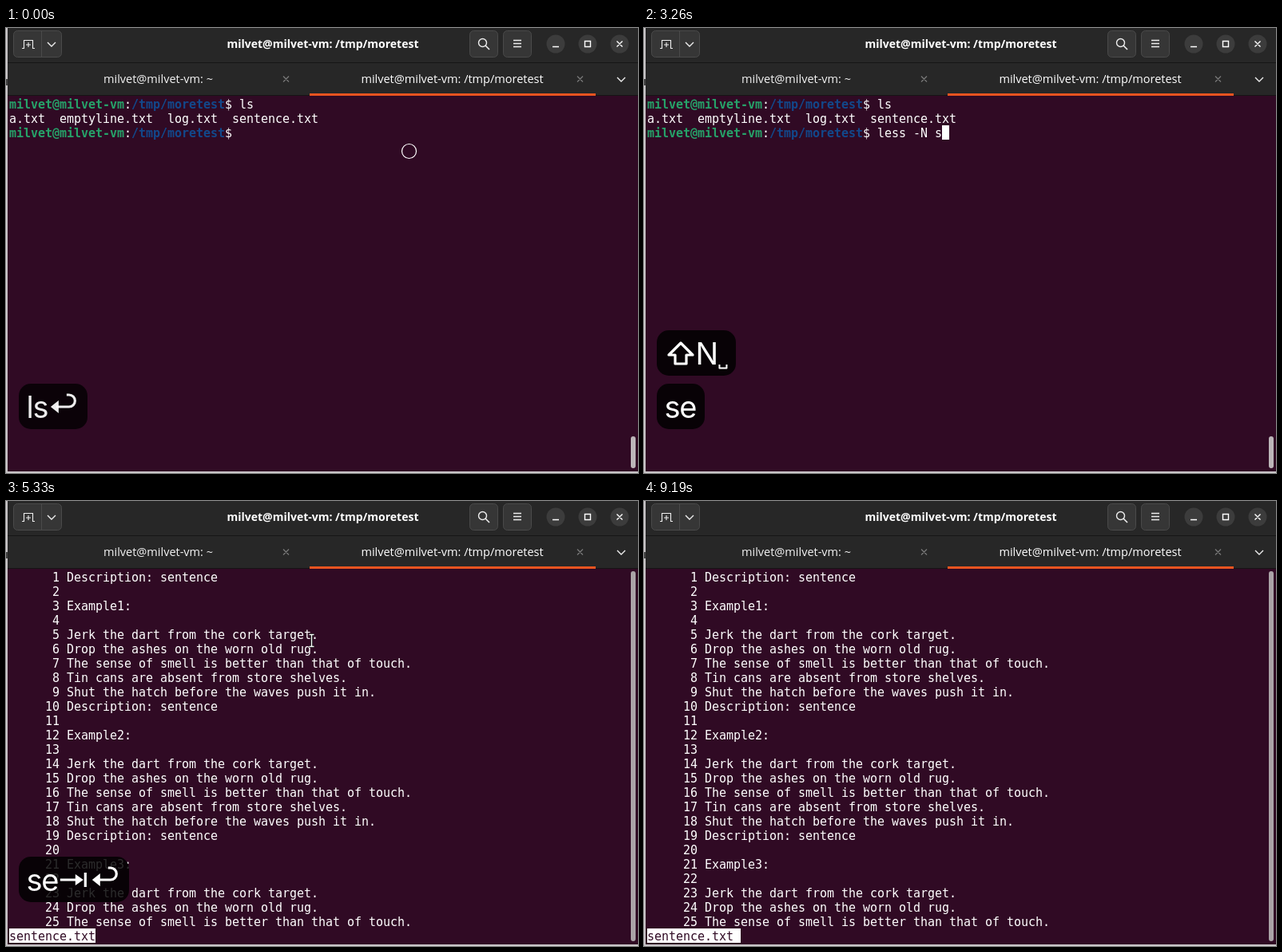
Recreate the animation shown at these times as an HTML page with a canvas. Size 791 px wide and 558 px high, loop 9490 ms.

```html
<!DOCTYPE html>
<html lang="en">
<head>
<meta charset="utf-8">
<title>Terminal: less -N</title>
<style>
  html, body { margin: 0; width: 100%; height: 100%; overflow: hidden; background: #300a24; }
  canvas { display: block; }
</style>
</head>
<body>
<canvas id="stage" width="791" height="558"></canvas>
<script>
const ctx = document.getElementById('stage').getContext('2d');
const LOOP = 9490, TICK = 148.28;
const BG = '#300a24', WHITE = '#fff';
const USER = 'milvet@milvet-vm', DIR = '/tmp/moretest';
const LEFT = 4, TOP = 86, CELL = 9, ROW = 18;
const UI = '"Open Sans", sans-serif', KEY_FONT = '38px Inter, sans-serif';

const passage = ['Description: sentence', '', 'Example', '',
  'Jerk the dart from the cork target.', 'Drop the ashes on the worn old rug.',
  'The sense of smell is better than that of touch.',
  'Tin cans are absent from store shelves.',
  'Shut the hatch before the waves push it in.'];

// [tick, value] lists: the last entry reached is current
const typed = [[0, ''], [3, 'l'], [4, 'le'], [5, 'les'], [6, 'less'], [8, 'less '], [9, 'less -'],
  [14, 'less -N'], [17, 'less -N '], [22, 'less -N s'], [23, 'less -N se'],
  [25, 'less -N sentence.txt ']];
const keys = [[0, 'ls↵'], [3, 'l'], [4, 'le'], [5, 'les'], [6, 'less'], [7, 'less␣'], [8, 'less␣-'],
  [14, '⇧N'], [17, '⇧N␣'], [21, 's'], [22, 'se'], [24, 'se⇥'], [29, 'se⇥↵']];
const pastKeys = [[0, ''], [3, 'ls↵'], [8, ''], [14, 'less␣-'], [21, '⇧N␣'], [31, '']];
const pointerPath = [[36, 382, 175], [42, 58, 147], [43, 58, 147], [45, 182, 147],
  [47, 185, 147], [50, 185, 147], [57, 727, 460], [61, 727, 460]];

const current = (list, tick) => list.filter(e => e[0] <= tick).pop()[1];
const within = (tick, from, to) => tick >= from && tick < to;
const clamp = v => Math.max(0, Math.min(1, v));

function rect(x, y, w, h, color) {
  ctx.fillStyle = color;
  ctx.fillRect(x, y, w, h);
}

function round(x, y, w, h, r, fill, stroke) {
  ctx.beginPath();
  ctx.roundRect(x, y, w, h, r);
  ctx.fillStyle = fill;
  ctx.fill();
  if (stroke) { ctx.strokeStyle = stroke; ctx.lineWidth = 1; ctx.stroke(); }
}

function line(d, color = WHITE, width = 1) {
  ctx.strokeStyle = color;
  ctx.lineWidth = width;
  ctx.stroke(new Path2D(d));
}

function circle(x, y, r) {
  ctx.beginPath();
  ctx.arc(x, y, r, 0, 7);
}

function label(text, x, y, font, color) {
  ctx.font = font;
  ctx.fillStyle = color;
  ctx.textAlign = 'center';
  ctx.fillText(text, x, y);
  ctx.textAlign = 'left';
}

function print(text, col, row, color = WHITE, bold = '') {
  ctx.font = `${bold} 15px "DejaVu Sans Mono", monospace`;
  ctx.fillStyle = color;
  [...text].forEach((c, i) => ctx.fillText(c, LEFT + (col + i) * CELL, TOP + row * ROW + 15));
}

function cells(col, row, count = 1) {
  rect(LEFT + col * CELL, TOP + row * ROW, count * CELL, ROW, WHITE);
}

function drawWindow() {
  rect(0, 0, 791, 558, '#c9c6c8');
  rect(2, 0, 789, 556, BG);
  rect(0, 64, 2, 8, '#444');
  rect(2, 0, 789, 85, '#272727');
  rect(2, 43, 789, 1, '#151515');
  rect(2, 84, 789, 1, '#151515');
  rect(380, 82, 358, 3, '#e95420');

  for (const [x, w] of [[9, 60], [580, 35], [622, 35]])
    round(x + .5, 3.5, w, 33, 5, '#363636', '#4a4a4a');
  line('M44.5 4V36', '#4a4a4a');
  line('M20 25.5H22.5V15.5H33.5V25.5H36M28 18V24M25 21H31', '#eee', 1.1);
  line('M52 18l5 5 5-5', '#eee', 1.4);
  circle(596.5, 18.5, 5);
  ctx.strokeStyle = '#eee';
  ctx.lineWidth = 1.4;
  ctx.stroke();
  line('M600 22l5 5', '#eee', 1.6);
  line('M635 15.5h10M635 19.5h10M635 23.5h10', '#eee', 1.3);

  for (const x of [688, 728, 768]) {
    circle(x, 20, 11.5);
    ctx.fillStyle = '#3c3c3c';
    ctx.fill();
  }
  line('M684 23.5h8M724.5 16.5h7v7h-7zM764.5 16.5l7 7m0-7l-7 7', WHITE, 1.4);

  const path = `${USER}: ${DIR}`;
  label(path, 396.5, 25, `bold 14px ${UI}`, WHITE);
  label(`${USER}: ~`, 190.5, 69, `14.5px ${UI}`, '#f4f4f4');
  label(path, 558.5, 69, `14.5px ${UI}`, WHITE);
  line('M347 60.5l7 7m0-7l-7 7M715 60.5l7 7m0-7l-7 7', '#777', 1.3);
  line('M765 62l5 5 5-5', '#eee', 1.4);
}

function drawPrompt(row, command) {
  print(USER, 0, row, '#26a269', 'bold');
  print(':', 16, row);
  print(DIR, 17, row, '#12488b', 'bold');
  print('$ ' + command, 30, row);
}

function drawShell(tick) {
  const command = current(typed, tick);
  drawPrompt(0, 'ls');
  print('a.txt  emptyline.txt  log.txt  sentence.txt', 0, 1);
  drawPrompt(2, command);
  if (tick >= 1) cells(32 + command.length, 2);
  round(782, 512, 6, 40, 3, '#bcb6b9');
}

function drawPager(tick) {
  for (let i = 0; i < 25; i++) {
    const text = passage[i % 9];
    const suffix = i % 9 === 2 ? `${Math.floor(i / 9) + 1}:` : '';
    print(`${i + 1}`.padStart(7) + ' ' + text + suffix, 0, i);
  }
  if (within(tick, 43, 49)) {
    cells(6, 3);
    print('4', 6, 3, BG);
  }
  cells(0, 25, 12);
  print('sentence.txt', 0, 25, BG);
  if (tick >= 61 || (tick - 29) % 8 < 4) cells(12, 25);
  round(782, 88, 6, 464, 3, '#aaa3a7');
}

// Key symbols: advance, stroked outline, stroke width, filled arrowhead
const symbols = {
  '↵': [39, 'M10-14H26a7.5 7.5 0 0 0 0-15H23', 3.2, 'M3-14L13-22V-6z'],
  '⇥': [39, 'M2-14H22M33.5-23V-5', 3.2, 'M31-14L21-21V-7z'],
  '⇧': [39, 'M20-27L35-12H27V-1H13V-12H5z', 3.2, ''],
  '␣': [13, 'M2 0V4.5H11V0', 2, '']
};

function drawKeys(text, y, alpha) {
  if (!text || alpha <= 0) return;
  ctx.save();
  ctx.globalAlpha = alpha;
  ctx.font = KEY_FONT;
  ctx.letterSpacing = '-1.2px';
  const parts = text.match(/[↵⇥⇧␣]|[^↵⇥⇧␣]+/g);
  const advance = p => symbols[p] ? symbols[p][0] : ctx.measureText(p).width;
  const width = parts.reduce((sum, p) => sum + advance(p), 20);
  round(16, y, Math.round(width), 57, 15, 'rgba(0,0,0,.83)');
  ctx.translate(26, y + 43);
  ctx.fillStyle = WHITE;
  ctx.lineJoin = 'round';
  for (const p of parts) {
    if (symbols[p]) {
      const [, outline, weight, head] = symbols[p];
      line(outline, WHITE, weight);
      ctx.fill(new Path2D(head));
    } else ctx.fillText(p, -.5, 0);
    ctx.translate(advance(p), 0);
  }
  ctx.restore();
}

function drawPointer(tick) {
  if (!within(tick, 36, 61)) return;
  const i = pointerPath.findIndex(p => p[0] > tick);
  const [t0, x0, y0] = pointerPath[i - 1], [t1, x1, y1] = pointerPath[i];
  const s = (tick - t0) / (t1 - t0), k = s * s * (3 - 2 * s);
  const x = Math.round(x0 + (x1 - x0) * k) + .5, y = Math.round(y0 + (y1 - y0) * k);
  const beam = `M${x - 3} ${y - 7.5}h2.5l.5 1 .5-1h2.5M${x} ${y - 7}v14M${x - 3} ${y + 7.5}h2.5l.5-1 .5 1h2.5`;
  line(beam, '#000', 3);
  line(beam, WHITE, 1.4);
}

function drawClick(x, y) {
  circle(x, y, 9);
  ctx.strokeStyle = WHITE;
  ctx.lineWidth = 1.2;
  ctx.stroke();
}

function draw(tick) {
  drawWindow();
  if (tick < 30) drawShell(tick); else drawPager(tick);

  const pastAlpha = tick < 8 ? (8.5 - tick) / 4.5 : (31 - tick) / 3;
  drawKeys(current(pastKeys, tick), 379, clamp(pastAlpha));
  drawKeys(current(keys, tick), 446, tick < 1 ? .93 : clamp((42 - tick) / 6));

  drawPointer(tick);
  if (tick === 0) drawClick(504.5, 154.5);
  if (tick === 43) drawClick(58.5, 146);
  if (tick === 47) drawClick(185.5, 145.5);
}

function frame() {
  const time = performance.now() % LOOP;
  draw(Math.min(63, Math.floor((time + 20) / TICK)));
  requestAnimationFrame(frame);
}
frame();
</script>
</body>
</html>
```
